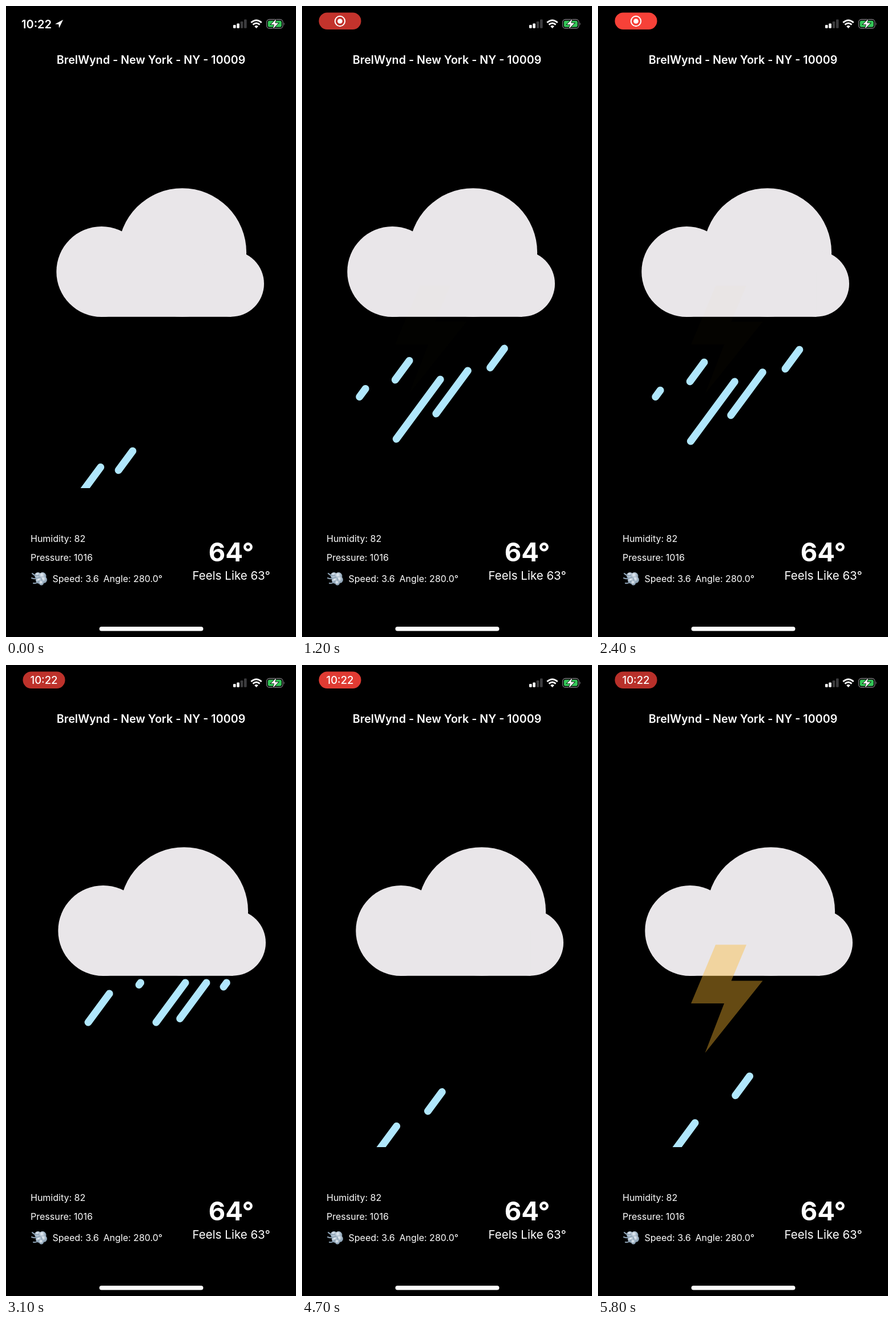
Write an HTML page that moves like this. It is 508 px wide and 1102 px high and loops after 5900 ms.

```html
<!DOCTYPE html>
<html lang="en">
<head>
<meta charset="utf-8">
<title>Weather</title>
<style>
  html, body { margin: 0; width: 100%; height: 100%; overflow: hidden; background: #000; }
  svg { display: block; width: 100vw; height: 100vh; }
  text { font-family: Inter, Roboto, sans-serif; fill: #fff; }
  .info { font-size: 16px; }
  .mid { text-anchor: middle; }
</style>
</head>
<body>
<svg viewBox="0 0 508 1102">
  <defs>
    <clipPath id="sky"><rect width="508" height="842"/></clipPath>
    <radialGradient id="puff" cx=".4" cy=".35">
      <stop offset="0" stop-color="#eef4fa"/>
      <stop offset="1" stop-color="#8fa5b8"/>
    </radialGradient>
  </defs>
  <rect width="508" height="1102" fill="#000"/>

  <g id="clock">
    <text x="27" y="38.5" font-size="20" font-weight="600">10:22</text>
    <path d="M86 31.5L100 24L93 38.5L92.3 32Z" fill="#fff"/>
  </g>
  <g id="pill">
    <rect id="pillBack" x="29.5" y="11.5" width="74" height="29.5" rx="14.7"/>
    <g id="recordIcon">
      <circle cx="66.5" cy="26.5" r="8.7" fill="none" stroke="#fff" stroke-width="2"/>
      <circle cx="66.5" cy="26.5" r="4.3" fill="#fff"/>
    </g>
    <text id="pillTime" class="mid" x="66.5" y="33" font-size="18.5" font-weight="500">10:22</text>
  </g>

  <g fill="#fff">
    <rect x="398" y="33" width="4.6" height="5.7" rx="1.2"/>
    <rect x="404.3" y="30.5" width="4.6" height="8.2" rx="1.2"/>
    <g fill="#3c3c3e">
      <rect x="410.7" y="27" width="4.6" height="11.7" rx="1.2"/>
      <rect x="417" y="23.5" width="4.6" height="15.2" rx="1.2"/>
    </g>
    <path d="M435.2 35.5Q438.5 32.7 441.8 35.5L438.5 38.9Z"/>
  </g>
  <g fill="none" stroke="#fff" stroke-width="2.8">
    <path d="M429.3 29Q438.5 20.8 447.7 29"/>
    <path d="M432.5 32.6Q438.5 27.3 444.5 32.6"/>
  </g>
  <rect x="456.5" y="23.5" width="28.5" height="15.5" rx="4.8" fill="none" stroke="#77777a" stroke-width="1.3"/>
  <rect x="458.7" y="25.7" width="24" height="11.1" rx="2.8" fill="#35c759"/>
  <path d="M486.7 28.7Q489 31.2 486.7 33.8Z" fill="#77777a"/>
  <path d="M473.5 22.5L464 32.3H470L467.5 40L477.3 29.8H471.2Z" fill="#fff" stroke="#000" stroke-width="1.5" paint-order="stroke"/>

  <text class="mid" x="254" y="101" font-size="19.7" font-weight="600">BrelWynd - New York - NY - 10009</text>

  <g id="rain" clip-path="url(#sky)" stroke="#b0e7fd" stroke-width="13" stroke-linecap="round"></g>
  <g id="cloud" fill="#e9e6e9">
    <circle cx="79" cy="464" r="79"/>
    <circle cx="220.5" cy="430.5" r="112.3"/>
    <circle cx="306" cy="485" r="57.7"/>
    <rect x="79" y="464" width="227" height="78.8"/>
  </g>
  <path id="bolt" d="M206 488.5H260L233.5 551.5H288.5L187.5 677.5L221 591H163Z" fill="#fcba30"/>

  <g class="info">
    <text x="43" y="936">Humidity: 82</text>
    <text x="43" y="969">Pressure: 1016</text>
    <text x="81.5" y="1005.5">Speed: 3.6</text>
    <text x="170.5" y="1005.5">Angle: 280.0°</text>
  </g>
  <g fill="url(#puff)">
    <circle cx="56" cy="995" r="6"/>
    <circle cx="64" cy="995.5" r="6.5"/>
    <circle cx="66" cy="1002" r="6"/>
    <circle cx="58" cy="1003" r="6"/>
    <circle cx="62" cy="1007.5" r="4.2"/>
  </g>
  <path d="M46 991Q51 996 57 994M45 999Q52 1002 59 998M48 1008Q54 1009 58 1004" fill="none" stroke="#8da2b5" stroke-width="2" stroke-linecap="round"/>
  <text class="mid" x="394.5" y="970" font-size="45.5" font-weight="700">64°</text>
  <text class="mid" x="394.7" y="1001.5" font-size="20.5">Feels Like 63°</text>
  <rect x="163.5" y="1084" width="182" height="7.5" rx="3.75" fill="#fff"/>
</svg>
<script>
const LOOP = 5900, STEP = 100;
const RAIN_CYCLE = 3, RAIN_LEAD = 0.62;
const SHOWERS = [0.7, 1.564, 2.757];   // seconds, key moment of each shower
const SLANT = 0.74, SPAWN_Y = 555;

// x at y = 0, top y at the key moment, length, px per second, lowest top, lowest bottom
const DROPS = [
  { axis: 605.8, top: 814, length: 50, speed: 400, rest: 900, end: 682.5 },
  { axis: 646.4, top: 765, length: 33.5, speed: 400, rest: 900, end: 720 },
  { axis: 724.8, top: 856, length: 104, speed: 560, rest: 960, end: 960 },
  { axis: 761.7, top: 782.5, length: 75, speed: 400, rest: 805.5, end: 960 },
  { axis: 797, top: 705.5, length: 33.5, speed: 295, rest: 960, end: 960 }
];

// [seconds, value]
const BOLT = [[-0.37, 0], [-0.05, 0.4], [0.06, 0.4], [0.13, 0]];
const PULSE = [[0.4, 1], [0.7, 0.88], [1.1, 0.72], [1.7, 1], [2.05, 1], [2.4, 0.97],
  [3.05, 0.72], [3.7, 0.99], [4.25, 0.72], [4.7, 0.88], [4.95, 1], [5.8, 0.72]];

const byId = id => document.getElementById(id);
const show = (id, on) => byId(id).setAttribute("visibility", on ? "inherit" : "hidden");

const lines = DROPS.map(() => {
  const line = document.createElementNS(byId("rain").namespaceURI, "line");
  byId("rain").append(line);
  return line;
});

function track(points, t) {
  if (t <= points[0][0]) return points[0][1];
  for (let i = 1; i < points.length; i++) {
    const [t0, a] = points[i - 1], [t1, b] = points[i];
    if (t <= t1) return a + (b - a) * (t - t0) / (t1 - t0);
  }
  return points[points.length - 1][1];
}

// Time relative to the key moment of the latest shower that has begun.
function showerTime(t) {
  const p = t % RAIN_CYCLE;
  const begun = SHOWERS.filter(moment => p >= moment - RAIN_LEAD);
  return begun.length ? p - begun.pop() : p - SHOWERS[SHOWERS.length - 1] + RAIN_CYCLE;
}

function cloudX(t) {
  const phase = (t + 0.5) % 1.5;
  return 73.3 + 30 * Math.min(phase, 1.5 - phase);
}

function drawRain(time) {
  DROPS.forEach((drop, i) => {
    const y = Math.min(drop.top + drop.speed * time, drop.rest);
    const top = Math.max(y, SPAWN_Y);
    const bottom = Math.min(y + drop.length, drop.end);
    const line = lines[i];
    line.setAttribute("visibility", bottom > top ? "visible" : "hidden");
    line.setAttribute("x1", drop.axis - SLANT * top);
    line.setAttribute("y1", top);
    line.setAttribute("x2", drop.axis - SLANT * bottom);
    line.setAttribute("y2", bottom);
  });
}

function draw(t) {
  const shower = showerTime(t);
  drawRain(shower);
  byId("cloud").setAttribute("transform", `translate(${cloudX(t)})`);
  byId("bolt").setAttribute("opacity", track(BOLT, shower));

  const recording = t >= 0.4, timed = t >= 3.1;
  show("clock", !recording);
  show("pill", recording);
  show("recordIcon", !timed);
  show("pillTime", timed);
  const glow = track(PULSE, t);
  byId("pillBack").setAttribute("fill", `rgb(${255 * glow},${67 * glow},${58 * glow})`);
}

const start = performance.now();
function tick() {
  const elapsed = (performance.now() - start) % LOOP;
  draw(Math.floor(elapsed / STEP) * STEP / 1000);
  requestAnimationFrame(tick);
}
tick();
</script>
</body>
</html>
```
